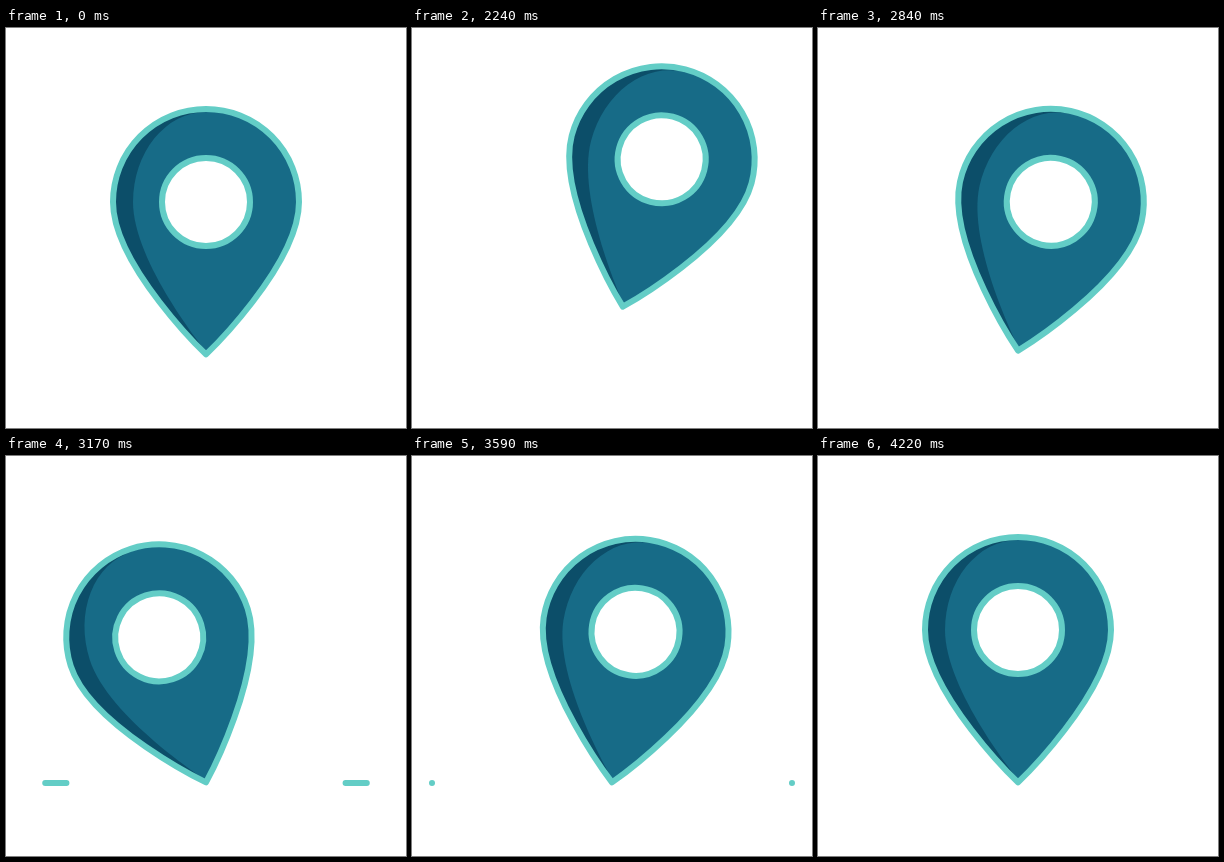
Animation, 400 px wide and 400 px high, one loop 4.49 s. Source, as an HTML page:

```html
<!DOCTYPE html>
<html lang="en">
<head>
<meta charset="utf-8">
<title>Jumping map pin</title>
<style>
  html, body { margin: 0; width: 100%; height: 100%; overflow: hidden; background: #fff; }
  svg { display: block; width: 100%; height: 100%; }
  .line { stroke: #63cdc6; stroke-width: 6; stroke-linecap: round; stroke-linejoin: round; }
</style>
</head>
<body>
<svg viewBox="0 0 400 400">
  <path id="dashes" class="line" fill="none"/>
  <!-- the pin's tip is the local origin -->
  <g id="pin">
    <path fill="#176b87" d="M0-245.4A93 93 0 0 1 93-152.4C93-89 0 0 0 0C0 0-93-89-93-152.4A93 93 0 0 1 0-245.4Z"/>
    <path fill="#0c4e69" d="M0-245.4A93 93 0 0 0-93-152.4C-93-89 0 0 0 0V-3C0-3-73-92-73-152.4A73 90 0 0 1 0-242.4Z"/>
    <path class="line" fill="none" d="M0-245.4A93 93 0 0 1 93-152.4C93-89 0 0 0 0C0 0-93-89-93-152.4A93 93 0 0 1 0-245.4Z"/>
    <circle class="line" cy="-152.4" r="44" fill="#fff"/>
  </g>
</svg>
<script>
  const LOOP = 4490, START = 2030, STEP = 30;
  const pin = document.getElementById('pin');
  const dashes = document.getElementById('dashes');

  const sineOut = u => Math.sin(u * Math.PI / 2);
  const quadIn = u => u * u;
  const sineInOut = u => (1 - Math.cos(u * Math.PI)) / 2;

  // [time, value, easing towards this key]
  const HEIGHT = [[2003, 0], [2570, 1, sineOut], [2600, 1, quadIn], [2846, 0, quadIn]];
  const ANGLE = [
    [2003, 0], [2570, 24.2, sineOut], [2600, 24.2, quadIn], [2846, 11.8, quadIn],
    [3100, -19.4, sineOut], [3570, 9, sineInOut], [3900, -4.2, sineInOut], [4220, 0, sineInOut]
  ];
  const OUTER = [[2850, 120], [3300, 20, sineInOut]];
  const INNER = [[2850, 120], [3420, 20, sineInOut]];

  function valueAt(keys, t) {
    if (t <= keys[0][0]) return keys[0][1];
    for (let i = 1; i < keys.length; i++) {
      const [t0, v0] = keys[i - 1], [t1, v1, ease] = keys[i];
      if (t < t1) return v0 + (v1 - v0) * ease((t - t0) / (t1 - t0));
    }
    return keys[keys.length - 1][1];
  }

  function draw(time) {
    let t = time % LOOP;
    t = t < START ? 0 : t - (t - START) % STEP;

    const h = valueAt(HEIGHT, t);
    const x = 200 + 29 * h * h, y = 326.4 - 78.3 * h;
    pin.setAttribute('transform',
      `translate(${x.toFixed(2)} ${y.toFixed(2)}) rotate(${valueAt(ANGLE, t).toFixed(3)})`);

    const a = valueAt(OUTER, t), b = valueAt(INNER, t) + 0.01;
    dashes.setAttribute('d', t > 2850 && t < 3620
      ? `M${a} 327H${b}M${400 - a} 327H${400 - b}` : '');
  }

  function tick() {
    draw(performance.now());
    requestAnimationFrame(tick);
  }
  tick();
</script>
</body>
</html>
```
